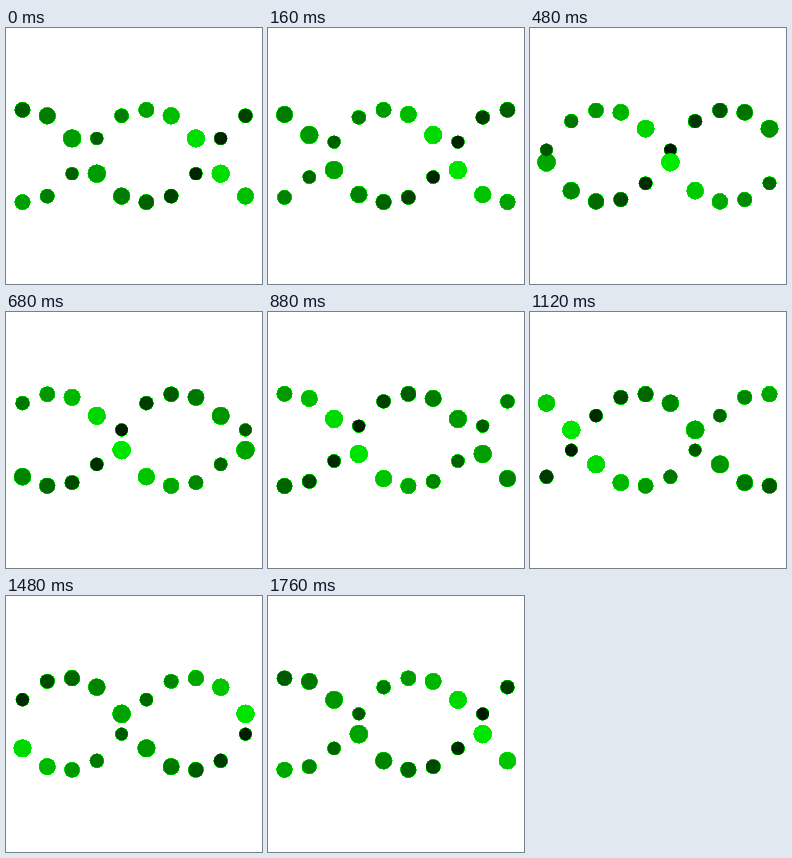
An HTML page with a canvas for the animation above (1.8 s loop, 256 by 256 pixels).

```html
<!DOCTYPE html>
<html>
<head>
<meta charset="utf-8">
<style>
  html, body { margin: 0; width: 100%; height: 100%; overflow: hidden; background: #fff; }
  canvas { display: block; width: 100vw; height: 100vh; image-rendering: pixelated; }
</style>
</head>
<body>
<canvas id="stage" width="256" height="256"></canvas>
<script>
const LOOP = 1800, STEP = 40, COLUMNS = 10, SIZE = 256;
const TOP = 81.92, BOTTOM = 174.08;
const R_MIN = 6.144, R_MAX = 9.216;
const KEY_LEVEL = 252;
const STRANDS = [
  { offset: 0, dark: 20, light: 170 },
  { offset: 0.5, dark: 78, light: 238 }
];

const ctx = document.getElementById('stage').getContext('2d', { willReadFrequently: true });
const mix = (a, b, k) => a + (b - a) * k;

// Linear 0 -> 1 -> 0 over one period.
const triangle = p => 1 - Math.abs(1 - 2 * (p - Math.floor(p)));

// cubic-bezier(.5, 0, .5, 1), solved by bisection.
function ease(x) {
  let lo = 0, hi = 1;
  for (let i = 0; i < 24; i++) {
    const s = (lo + hi) / 2;
    if (1.5 * s * (1 - s) + s ** 3 < x) lo = s; else hi = s;
  }
  return lo * lo * (3 - 2 * lo);
}

function drawDot(column, strand, progress) {
  const p = progress + column / COLUMNS + strand.offset;
  const depth = triangle(p + 0.25);
  const x = SIZE * (2 + 3 * column) / 31;
  const y = mix(TOP, BOTTOM, ease(triangle(p)));
  ctx.fillStyle = `rgb(0,${Math.round(mix(strand.dark, strand.light, depth))},0)`;
  ctx.beginPath();
  ctx.arc(x, y, mix(R_MIN, R_MAX, depth), 0, 2 * Math.PI);
  ctx.fill();
}

// Turns the green backdrop white and keeps the hard green rim of the dots.
function keyOutBackdrop() {
  const image = ctx.getImageData(0, 0, SIZE, SIZE);
  const data = image.data;
  for (let i = 0; i < data.length; i += 4) {
    if (data[i + 1] >= KEY_LEVEL) data[i] = data[i + 1] = data[i + 2] = 255;
  }
  ctx.putImageData(image, 0, 0);
}

function draw(frame) {
  ctx.fillStyle = '#0f0';
  ctx.fillRect(0, 0, SIZE, SIZE);
  for (let column = 0; column < COLUMNS; column++) {
    for (const strand of STRANDS) drawDot(column, strand, frame * STEP / LOOP);
  }
  keyOutBackdrop();
}

const start = performance.now();
let shown = -1;
function tick() {
  const frame = Math.floor(((performance.now() - start) % LOOP) / STEP);
  if (frame !== shown) draw(shown = frame);
  requestAnimationFrame(tick);
}
tick();
</script>
</body>
</html>
```
